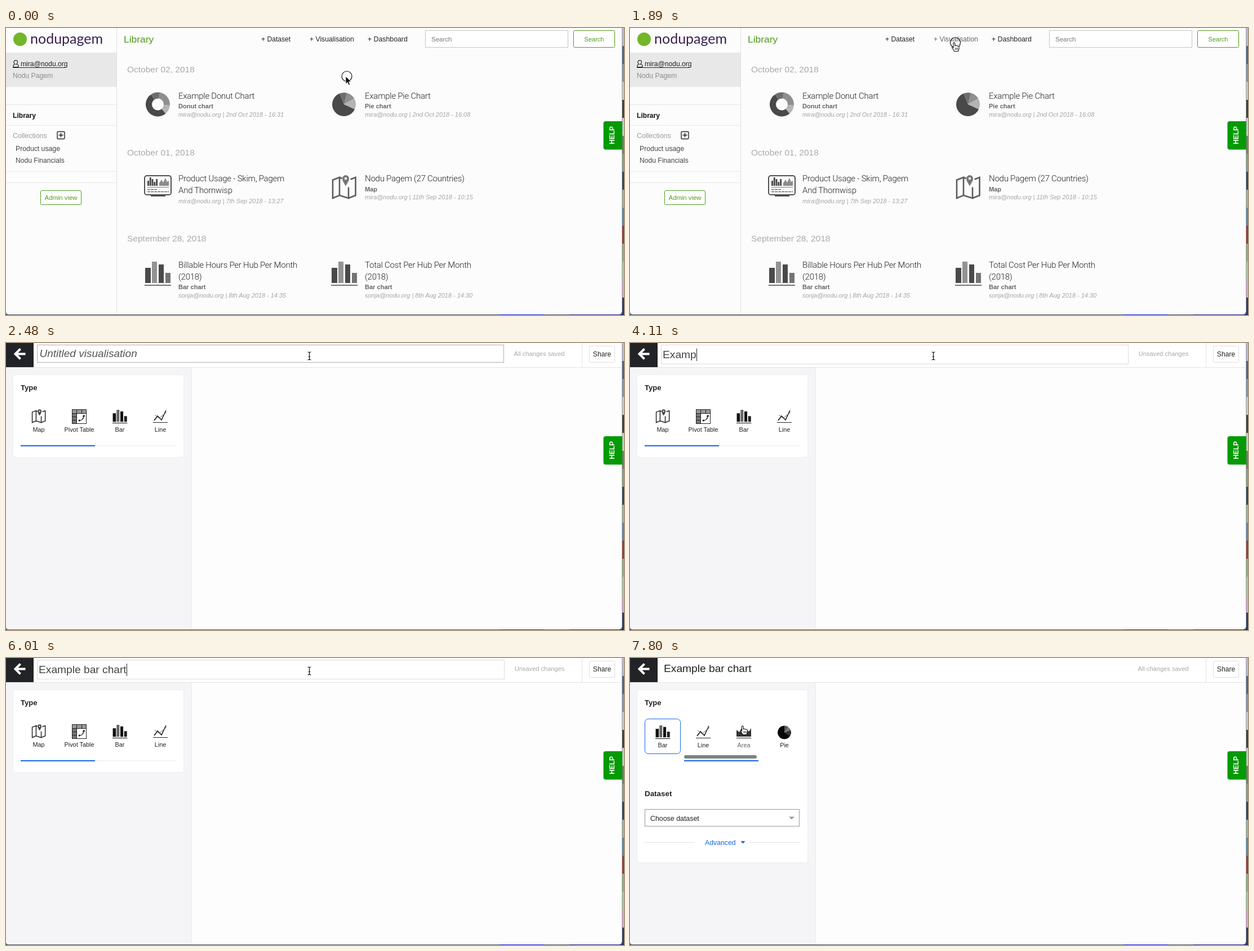
These frames come from a looping animation (1097 by 511 pixels, 8000 ms). An HTML page:

```html
<!DOCTYPE html>
<html lang="en">
<head>
<meta charset="utf-8">
<title>New visualisation</title>
<style>
html, body { margin: 0; width: 100%; height: 100%; overflow: hidden; background: #fcfcfc; }
svg { display: block; width: 1097px; height: 511px; }
text { font-family: "Liberation Sans", Arial, sans-serif; white-space: pre; }
.b { font-weight: bold; }
.i { font-style: italic; }
.mid { text-anchor: middle; }
.end { text-anchor: end; }
.light { font-family: Roboto, "Liberation Sans", sans-serif; font-weight: 300; letter-spacing: -.24px; }
.brand { font-family: Lato, "Liberation Sans", sans-serif; }
</style>
</head>
<body>
<svg id="stage" viewBox="0 0 1097 511" xmlns="http://www.w3.org/2000/svg"></svg>
<script>
const GREEN = '#4f9a1a', BLUE = '#1768e6';

const text = (x, y, size, str, fill = '#222', cls = '', more = '') =>
  `<text x="${x}" y="${y}" font-size="${size}" fill="${fill}" class="${cls}" ${more}>${str}</text>`;
const rect = (x, y, w, h, fill, more = '') =>
  `<rect x="${x}" y="${y}" width="${w}" height="${h}" fill="${fill}" ${more}/>`;
const box = (x, y, w, h, stroke, rx = 0, fill = '#fff', width = 1) =>
  rect(x + .5, y + .5, w, h, fill, `stroke="${stroke}" stroke-width="${width}" rx="${rx}"`);
const path = (d, fill, stroke = 'none', width = 1, more = '') =>
  `<path d="${d}" fill="${fill}" stroke="${stroke}" stroke-width="${width}" ${more}/>`;
const circle = (x, y, r, fill, more = '') => `<circle cx="${x}" cy="${y}" r="${r}" fill="${fill}" ${more}/>`;
const group = (x, y, inner, scale = 1) => `<g transform="translate(${x} ${y}) scale(${scale})">${inner}</g>`;
const layer = (id, inner) => `<g id="${id}">${inner}</g>`;

// Slices are [start, end, colour], in degrees clockwise from the top.
function pie(r, slices) {
  const at = deg => {
    const a = deg * Math.PI / 180;
    return `${(r * Math.sin(a)).toFixed(2)} ${(-r * Math.cos(a)).toFixed(2)}`;
  };
  return slices.map(([a, b, c]) =>
    path(`M0 0L${at(a)}A${r} ${r} 0 ${b - a > 180 ? 1 : 0} 1 ${at(b)}Z`, c)).join('');
}

const bars = (dark, pale, mid) =>
  rect(1, 11, 10, 27, dark) + rect(13, 0, 9, 38, pale) + rect(25, 5, 9, 33, dark) +
  rect(37, 20, 9, 18, mid) + rect(0, 41, 47, 2, mid);

const map = (line, pin) =>
  path('M1.500 9L13.500 4.500V36.500L1.500 41.500ZM13.500 4.500L18 6.500M13.500 36.500L29.500 41.500V22M29.500 41.500L42 36.500V4.500L33 8', 'none', line, 2.6) +
  path('M24.500 20C21.500 14 18.500 11 18.500 6.500A6 6 0 0 1 30.500 6.500C30.500 11 27.500 14 24.500 20Z', pin) +
  circle(24.5, 6.5, 2.2, '#fff');

const board =
  box(.5, .5, 47, 34, '#505050', 4, '#fcfcfc', 2) + rect(12, 36, 26, 2, '#505050') +
  [9, 15, 12, 7, 12].map((h, k) => rect(6 + k * 3.8, 19 - h, 2.9, h, '#484848')).join('') +
  path('M27 19V14L31 8L34 13L38 5L41 12L44 10V19Z', '#8c8c8c') + rect(6, 21, 38, 1, '#777') +
  path('M6 25.500H24M6 29.500H44', 'none', '#666', 1.4, 'stroke-dasharray="5 1"');

const lineIcon =
  path('M-11 138L-5 130L2 137L10 120', 'none', '#111', 1.5) +
  path('M-10 128L-2 134L11 123', 'none', '#666', 1) + rect(-13, 141, 26, 1, '#222');

const areaIcon =
  path('M-13 139V127L-8 131L-4 124L1 130L5 126L9 130L13 124V139Z', '#333') + rect(-13, 141, 26, 1, '#222');

const pivotIcon =
  box(-13, 118, 25, 25, '#222') +
  rect(-12, 119, 24, 6, '#999') + rect(-12, 125, 7, 18, '#777') +
  path('M-13 125.500H13M-4.500 118V144M4.500 118V125M-13 131.500H-4.500M-13 137.500H-4.500', 'none', '#222') +
  path('M0 138Q7 138 8 130', 'none', '#111', 1.4) + path('M5.500 131L8.500 127.500L10.500 131Z', '#111') +
  path('M1 136L-2 138L1 140Z', '#111');

const types = [
  ['Map', group(-12.3, 118, map('#222', '#444'), .57)],
  ['Pivot Table', pivotIcon],
  ['Bar', group(-13, 119, bars('#111', '#666', '#222'), .56)],
  ['Line', lineIcon],
  ['Area', areaIcon],
  ['Pie', group(0, 131.5, pie(12, [[0, 35, '#555'], [35, 70, '#777'], [70, 120, '#333'], [120, 360, '#080808']]))],
];

function card(x, y, lines, kind, meta, icon) {
  const gap = 21 * (lines.length - 1);
  return icon + lines.map((s, k) => text(x, y + 21 * k, 15, s, '#222', 'light')).join('') +
    (kind && text(x, y + gap + 17.5, 11.05, kind, '#666', 'b')) +
    text(x, y + gap + (kind ? 32 : 18), 10.95, meta, '#a4a4a4', 'i');
}

const user = 'mira@nodu.org', other = 'sonja@nodu.org';
const greyBars = bars('#4a4a4a', '#939393', '#747474');

const library =
  rect(0, 0, 1093, 510, '#fcfcfc') + rect(0, 44, 196, 61, '#e8e8e8') + rect(196, 0, 1, 510, '#e2e2e2') +
  [44, 136, 173, 255, 275].map(y => rect(0, y, 196, 1, '#e6e6e6')).join('') +
  circle(25, 20, 12, '#72b62b') + text(43, 28, 25, 'nodupagem', '#36204d', 'brand') +
  path('M13 69.500V67Q13 65 16 64.500Q13.800 63 13.800 61A3.400 3.400 0 0 1 20.600 61Q20.600 63 18.500 64.500Q22 65 22 67V69.500Z', 'none', '#222', 1.1) +
  text(26, 68, 12.1, user) + rect(12, 70, 94, 1, '#222') +
  text(12, 89, 12.2, 'Nodu Pagem', '#8c8c8c') +
  text(12, 160, 12.1, 'Library', '#111', 'b') +
  text(12, 196, 12.4, 'Collections', '#9a9a9a') +
  box(90.5, 184, 13, 13, '#222', 2, '#fff', 1.4) + path('M97.500 187V194.500M93.500 190.700H101.500', 'none', '#222', 1.6) +
  text(17, 219, 12.25, 'Product usage', '#444') + text(17, 240, 12.1, 'Nodu Financials', '#444') +
  box(61, 289, 72, 25, GREEN, 2) + text(97.5, 305.5, 11.3, 'Admin view', GREEN, 'mid') +
  text(209, 26, 17.4, 'Library', GREEN) +
  text(453, 24, 12.1, '+ Dataset') + text(539, 24, 12.2, '+ Visualisation', '#222', '', 'id="newVis"') +
  text(642, 24, 12.3, '+ Dashboard') +
  box(744, 4, 253, 30, '#c4c4c4') + text(755, 24, 11.5, 'Search', '#777') +
  box(1007, 4, 73, 30, GREEN, 2) + text(1044, 24, 11, 'Search', GREEN, 'mid') +
  text(215, 79, 15.5, 'October 02, 2018', '#aaa') +
  text(215, 226.5, 15.5, 'October 01, 2018', '#aaa') +
  text(215, 380, 15.5, 'September 28, 2018', '#aaa') +
  card(306, 125.5, ['Example Donut Chart'], 'Donut chart', user + ' | 2nd Oct 2018 - 16:31',
    group(269.5, 136, pie(21.5, [[-35, 10, '#6e6e6e'], [10, 95, '#8f8f8f'], [95, 140, '#b4b4b4'], [140, 325, '#494949']]) +
      circle(0, 0, 10.5, '#fcfcfc'))) +
  card(637, 125.5, ['Example Pie Chart'], 'Pie chart', user + ' | 2nd Oct 2018 - 16:08',
    group(600, 136, pie(21, [[-22, 15, '#6e6e6e'], [15, 60, '#8f8f8f'], [60, 115, '#b4b4b4'], [115, 338, '#494949']]))) +
  card(306, 273, ['Product Usage - Skim, Pagem', 'And Thornwisp'], '', user + ' | 7th Sep 2018 - 13:27',
    group(245, 262, board)) +
  card(637, 273, ['Nodu Pagem (27 Countries)'], 'Map', user + ' | 11th Sep 2018 - 10:15',
    group(578.5, 261.5, map('#5c5c5c', '#777'))) +
  card(306, 426.5, ['Billable Hours Per Hub Per Month', '(2018)'], 'Bar chart', other + ' | 8th Aug 2018 - 14:35',
    group(246, 416, greyBars)) +
  card(637, 426.5, ['Total Cost Per Hub Per Month', '(2018)'], 'Bar chart', other + ' | 8th Aug 2018 - 14:30',
    group(577, 416, greyBars));

const header =
  rect(0, 0, 1093, 43, '#fff') + rect(0, 43, 1093, 1, '#e4e4e4') + rect(0, 0, 49, 43, '#222326') +
  path('M34.500 19.500H18M25.500 10.500L16.500 19.500L25.500 28.500', 'none', '#fff', 4) +
  rect(1022, 0, 1, 43, '#e4e4e4') + box(1035, 5, 45, 29, '#dedede', 2) +
  text(1058, 24, 12.1, 'Share', '#222', 'mid') +
  text(991.5, 23, 11.1, '', '#a8a8a8', 'end', 'id="saved"') +
  layer('idle', box(55, 3, 828, 31, '#b0b0b0') + text(59.5, 25.3, 19, 'Untitled visualisation', '#555', 'i')) +
  layer('edit', box(55, 3, 829, 34, '#dadada') + text(58, 27, 19.2, '', '#444', '', 'id="typed"') +
    rect(0, 10, 1, 22, '#222', 'id="caret"')) +
  layer('done', text(60, 25.3, 19.2, 'Example bar chart', '#222'));

const dataset =
  text(26, 245.5, 13.4, 'Dataset', '#222', 'b') + box(26, 269, 274, 30, '#999') +
  text(36, 290, 12.4, 'Choose dataset') + path('M282 282.500H292L287 287.500Z', '#999') +
  rect(26, 328, 89, 1, '#e4e4e4') + rect(212, 328, 90, 1, '#e4e4e4') +
  text(133, 333, 12.3, 'Advanced', BLUE) + path('M196.500 326H204.500L200.500 330.500Z', BLUE);

const editor =
  rect(0, 0, 1093, 510, '#fdfdfd') + rect(0, 44, 329, 466, '#f5f5f7') + rect(329, 44, 1, 466, '#ebebeb') + header +
  rect(12.5, 56.5, 303, 147, '#fff', 'stroke="#eee" rx="4" id="card"') + text(26, 84.3, 13, 'Type', '#222', 'b') +
  layer('picked', box(26, 108, 63, 62, BLUE, 6)) +
  '<g clip-path="url(#panel)">' + layer('types', types.map(([name, icon], k) =>
    group(58 + 72 * k, 0, icon + text(0, 158, 10.9, name, '#222', 'mid', `id="type${k}"`))).join('')) + '</g>' +
  rect(26, 182.5, 276, 1, '#e8e8e8', 'id="track"') +
  rect(26, 182, 132, 2, BLUE, 'id="thumb"') +
  layer('chosen', rect(96, 173, 129, 6, '#808080', 'rx="3"') + dataset) +
  layer('status', path('M0 492H359Q363 492 363 496V511H0Z', '#2c3134') +
    text(2.5, 505.3, 11.1, 'Waiting for nodu.piwikpro.com...', '#bcc0c2'));

// Slivers of the desktop behind the window.
const strip = ['#b9b6cc', '#4d6484', '#8593a5', '#c2c4c8', '#39423f', '#c8c8c8', '#70806c', '#8b9b83', '#31475a',
  '#9fae95', '#5b87a0', '#953c38', '#93a985', '#a7c49a', '#d3a5c4', '#2c3d63'];
const desktop = rect(0, 0, 1097, 511, '#4b5560') +
  strip.map((c, k) => rect(1094, k * 32, 3, 32, c)).join('') +
  rect(877, 510, 78, 1, '#1b1bd0') + rect(1000, 510, 97, 1, '#20207c');

const help = path('M1094 166H1064.500Q1060.500 166 1060.500 170V212.500Q1060.500 216.500 1064.500 216.500H1094Z', '#049a04') +
  text(0, 0, 12, 'HELP', '#fff', 'b mid', 'transform="translate(1080.300 191) rotate(-90)"');

const beam = 'M-3-7Q0-7 0-5Q0-7 3-7M0-5V5M-3 7Q0 7 0 5Q0 7 3 7M-1.800 1.500H1.800';
const pointers =
  layer('ring', circle(2, 0, 9, 'none', 'stroke="#111" stroke-width="1.2"')) +
  layer('arrow', path('M0 0V13.500L3.200 10.700L5.200 15.500L7.600 14.500L5.600 9.800H9.800Z', '#000', '#fff', .9)) +
  layer('hand', path('M-1.500 9V1.200Q-1.500 0 0 0Q1.300 0 1.300 1.200V5.500Q2.500 4.500 3.800 5.700Q5.300 5 6.300 6.400Q8 6 8.500 7.500V10.500Q8 12.500 7 15.500H.3Q-1 12.500-3.600 9.800Q-4.500 8-3 7.700Q-2.200 8-1.500 9Z', '#fff', '#111', 1.1) +
    path('M2 9V13M4 9V13M6 9V13', 'none', '#111', .8)) +
  layer('beam', path(beam, 'none', '#fff', 2.6) + path(beam, 'none', '#111', 1.2));

document.getElementById('stage').innerHTML =
  '<defs><clipPath id="panel"><rect x="14" y="90" width="300" height="90"/></clipPath>' +
  '<clipPath id="window"><path d="M0 0H1093V505Q1093 510 1088 510H5Q0 510 0 505Z"/></clipPath></defs>' +
  desktop + rect(1093, 0, 1, 506, '#a9a9a9') +
  `<g clip-path="url(#window)">${layer('library', library)}${layer('editor', editor)}</g>` +
  help + layer('pointer', pointers);

const LOOP = 8000, KEY = 145, TITLE = 'Example bar chart';
const OPEN = 2040, FOCUS = 3080, BLUR = 7500, PICK = 7650, SAVE = 7800;

// [time, x, y, pointer, ring]
const moves = [
  [0, 603, 86, 'arrow', 1], [150, 578, 66, 'arrow'], [570, 576, 55, 'arrow'], [715, 575, 44, 'arrow'],
  [860, 575, 36, 'arrow'], [1005, 575, 29, 'hand'], [1150, 575.5, 26, 'hand'], [1890, 575.5, 26, 'hand', 1],
  [2040, 576, 25.5, 'beam'], [2190, 562, 24.5, 'beam'], [2330, 545, 23, 'beam'], [2480, 538.5, 23, 'beam'],
  [2930, 538.5, 23, 'beam', 1], [3080, 538.5, 23, 'beam'], [6310, 505, 30, 'beam'], [6458, 425, 62, 'arrow'],
  [6606, 335, 92, 'arrow'], [6755, 265, 112, 'arrow'], [6903, 222, 120, 'hand'], [7050, 205, 121, 'hand'],
  [7200, 200, 121, 'hand'], [7500, 200, 121, 'hand', 1], [7650, 200, 121, 'hand'],
];
// Bursts of keys: [first key time, characters before, characters after]
const bursts = [[3515, 0, 7], [4550, 7, 12], [5430, 12, 17]];

const el = {};
document.querySelectorAll('[id]').forEach(n => el[n.id] = n);
const show = (id, on) => { el[id].style.display = on ? '' : 'none'; };
const set = (id, name, value) => el[id].setAttribute(name, value);

function typedCount(t) {
  return bursts.reduce((n, [start, from, to]) =>
    t < start ? n : Math.min(to, from + 1 + Math.floor((t - start) / KEY)), 0);
}

function draw(t) {
  const [, x, y, kind, ring] = moves.filter(m => m[0] <= t).pop();
  set('pointer', 'transform', `translate(${x} ${y})`);
  for (const k of ['arrow', 'hand', 'beam']) show(k, k === kind);
  show('ring', ring);

  show('library', t < OPEN);
  show('editor', t >= OPEN);
  set('newVis', 'fill', t >= 1005 ? '#666' : '#222');
  show('status', t < 2330);

  const editing = t >= FOCUS && t < BLUR;
  show('idle', t < FOCUS);
  show('edit', editing);
  show('done', t >= BLUR);
  el.saved.textContent = t >= FOCUS && t < SAVE ? 'Unsaved changes' : 'All changes saved';
  if (editing) {
    el.typed.textContent = TITLE.slice(0, typedCount(t));
    set('caret', 'x', Math.round(58 + el.typed.getComputedTextLength()));
    show('caret', t < 3370 || t >= bursts[0][0]);
  }

  const picked = t >= PICK;
  show('picked', picked);
  show('chosen', picked);
  show('track', !picked);
  set('types', 'transform', picked ? 'translate(-144 1)' : '');
  set('thumb', 'x', picked ? 96 : 26);
  set('card', 'height', picked ? 308 : 147);
  set('type2', 'fill', t >= 6903 && !picked ? '#666' : '#222');
  set('type4', 'fill', picked ? '#666' : '#222');
}

const begin = performance.now();
function tick() {
  draw((performance.now() - begin) % LOOP);
  requestAnimationFrame(tick);
}
tick();
</script>
</body>
</html>
```
